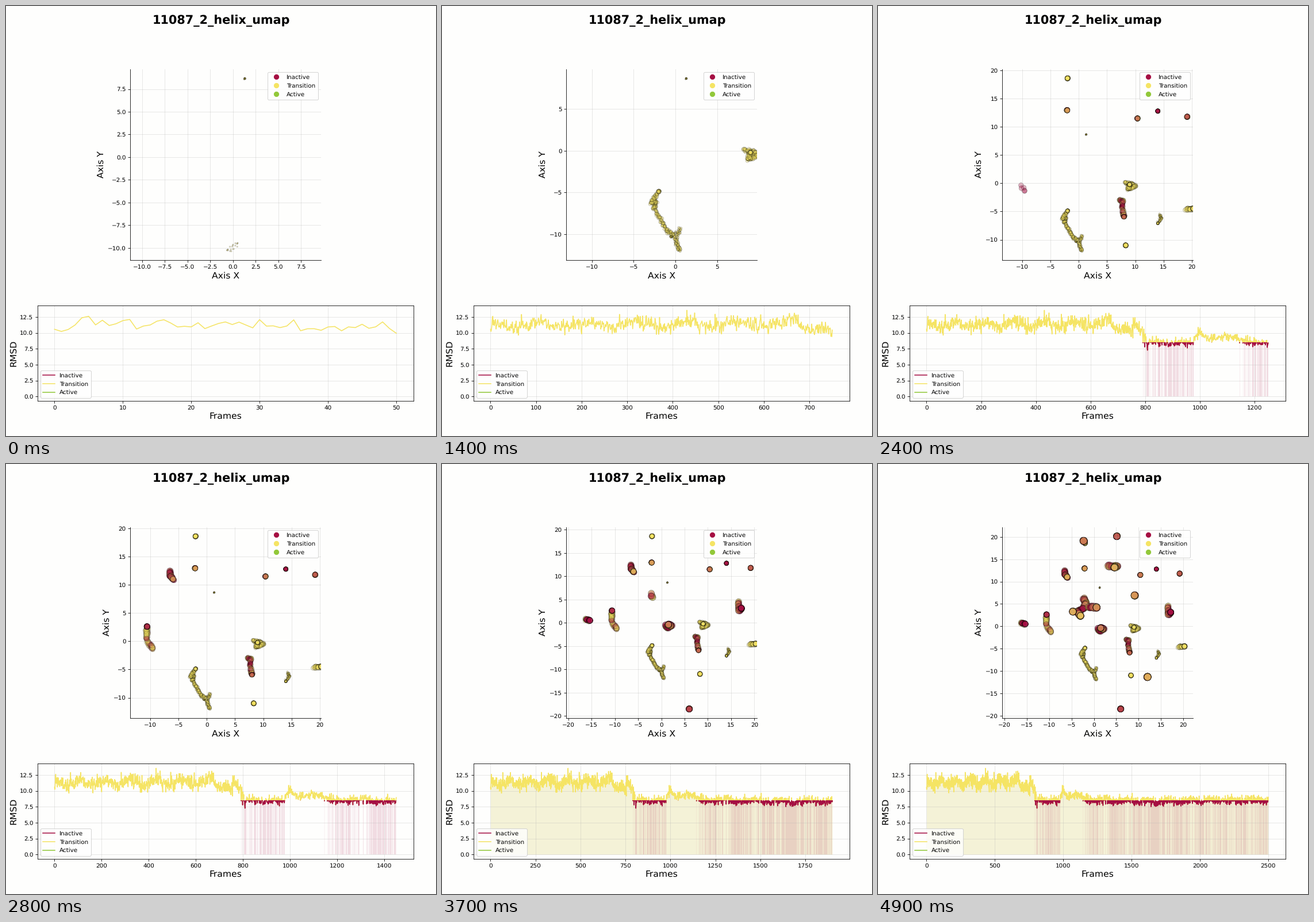
Animation of 748 by 748 pixels, one loop 5 s. Source, as a matplotlib script:

```python
import numpy as np
import matplotlib.pyplot as plt
from matplotlib.animation import FuncAnimation
from matplotlib.lines import Line2D
from matplotlib.patches import Rectangle

SIZE, DPI = 748, 74.8
STEPS, PER_STEP = 50, 50
TOTAL = STEPS * PER_STEP + 1
RED, YELLOW, GREEN = "#a50f43", "#f5e464", "#92c83a"
PAPER, WASH = "#fefefd", "#f4f2d7"
THRESHOLD = 8.5
rng = np.random.default_rng(11087)
time = np.arange(TOTAL)

# Conformations in visiting order; near neighbours are joined by a streak.
TOUR = np.array([
    1.3+8.65j, .6-9.5j, -.5-10.3j, 14.3-5.5j, 14.6-6.2j, 14-7.1j,
    .5-9.3j, 0-10.9j, .5-11.9j, -.3-10j, -1.1-9.6j, -1.7-8.3j,
    -2.6-6.9j, -2.3-6.1j, -2.9-6.2j, -2-4.9j,
    8.2+.1j, 9.3-.1j, 10-.5j, 8.7-1.1j, 9-.2j, 14+12.8j,
    7.1-2.9j, 7.8-3.2j, 7.7-4.6j, 8-5.9j, 8.3-11j, -2+18.6j,
    19-4.6j, 20.3-4.5j, 10.4+11.5j, 19.2+11.8j, -2.1+12.95j,
    -9.6-1.3j, -10.7+.3j, -10.6+2.6j, -6.5+12.5j, -6.5+11.6j, -6+11j,
    -16.2+.7j, -15.4+.5j, 16.6+4.8j, 16.7+2.6j, 17.2+3.1j, 6-18.5j,
    1-.6j, 1.4-1j, 2.2-.6j, 1.5-.4j, -2.3+6.2j, -1.8+5.2j, -2.3+4j,
    -3.7+3.3j, -3+2.3j, 5.15+20.15j, 3.1+13.5j, 5.2+13.4j, 4.6+13.2j,
    -4.7+3.3j, -1.2+4.4j, .6+4.2j, 9.15+6.9j, 12-11.35j, -2.3+19.1j,
])


def make_points():
    stop = (len(TOUR) * (time / TOTAL) ** (1 / 1.053)).astype(int)
    here, ahead = TOUR[stop], np.append(TOUR[1:], np.inf)[stop]
    streak = abs(ahead - here) < 3
    travel = np.where(streak, ahead - here, 0) * rng.random(TOTAL)
    wobble = np.clip(rng.normal(size=(2, TOTAL)), -1.6, 1.6)
    spot = here + travel + np.where(streak, .12, .05) * (wobble[0] + 1j * wobble[1])
    return np.column_stack([spot.real, spot.imag])


def make_rmsd():
    trend = np.interp(time, [0, 660, 780, 815, 972, 1000, 1030, 1090, 1165, 1700, 2200],
                      [11.2, 11.5, 10.3, 8.5, 8.4, 10.1, 9.1, 9.6, 8.6, 8.3, 8.55])
    early = time < 812
    wave = np.where(early, .4 * np.cos(2 * np.pi * (time - 102) / 110),
                    .15 * np.sin(time / 25))
    noise = rng.normal(size=TOTAL) * np.where(early, .6, .33)
    noise[1:] += .25 * noise[:-1]
    floor = np.where(early, trend - 1.6, 7.1)
    return np.clip(trend + wave + noise, floor, 13.6)


points, rmsd = make_points(), make_rmsd()
inactive = rmsd < THRESHOLD
red_run = inactive | np.r_[False, inactive[:-1]]

plt.rcParams["text.hinting"] = "none"
fig = plt.figure(figsize=(SIZE / DPI, SIZE / DPI), dpi=DPI, facecolor=PAPER)
fig.suptitle("11087_2_helix_umap", fontsize=20, fontweight="bold")


def add_panel(left, top, right, bottom, xlabel, ylabel):
    ax = fig.add_axes([left / SIZE, 1 - bottom / SIZE,
                       (right - left) / SIZE, (bottom - top) / SIZE],
                      facecolor=PAPER)
    ax.set_xlabel(xlabel, fontsize=15)
    ax.set_ylabel(ylabel, fontsize=15)
    ax.grid(alpha=.35)
    return ax


space = add_panel(216.1, 110, 547.8, 441.7, "Axis X", "Axis Y")
space.spines[["top", "right"]].set_visible(False)
trace = add_panel(54.7, 521.2, 708.6, 686.7, "Frames", "RMSD")
trace.set_ylim(-.68, 14.28)
trace.set_yticks(np.arange(0, 13, 2.5))

states = list(zip(("Inactive", "Transition", "Active"), (RED, YELLOW, GREEN)))
space.legend(handles=[Line2D([0], [0], marker="o", color="w", markersize=10,
                             markerfacecolor=c, label=name)
                      for name, c in states], loc="upper right")
trace.legend(handles=[Line2D([0], [0], color=c, label=name)
                      for name, c in states], loc="lower left")

dots = space.scatter(points[:, 0], points[:, 1], s=2 + time * .054,
                     c=np.where(inactive, RED, YELLOW), alpha=.33,
                     edgecolors="black", linewidths=.6)
yellow_line, = trace.plot([], [], color=YELLOW, lw=1.5)
red_line, = trace.plot([], [], color=RED, lw=1.5)
red_line.set_clip_path(Rectangle((0, 0), TOTAL, THRESHOLD,
                                 transform=trace.transData))
fills = []


def update(step):
    n = (step + 1) * PER_STEP + 1
    x, y = time[:n], rmsd[:n]
    dots.set_offsets(points[:n])
    low, high = points[:n, 1].min(), points[:n, 1].max()
    margin = .05 * (high - low)
    space.set_xlim(low - margin, high + margin)
    space.set_ylim(low - margin, high + margin)

    yellow_line.set_data(x, y)
    red_line.set_data(x, y)
    trace.set_xlim(-.05 * (n - 1), 1.05 * (n - 1))
    while fills:
        fills.pop().remove()
    if step >= 32:
        fills.append(trace.fill_between(x, y, color=WASH, lw=0))
    fills.append(trace.fill_between(x, y, where=red_run[:n], color=RED,
                                    alpha=.14, lw=0))
    return [dots, yellow_line, red_line, *fills]


anim = FuncAnimation(fig, update, frames=STEPS, interval=100, repeat=True,
                     repeat_delay=0, blit=False)
plt.show()
```
